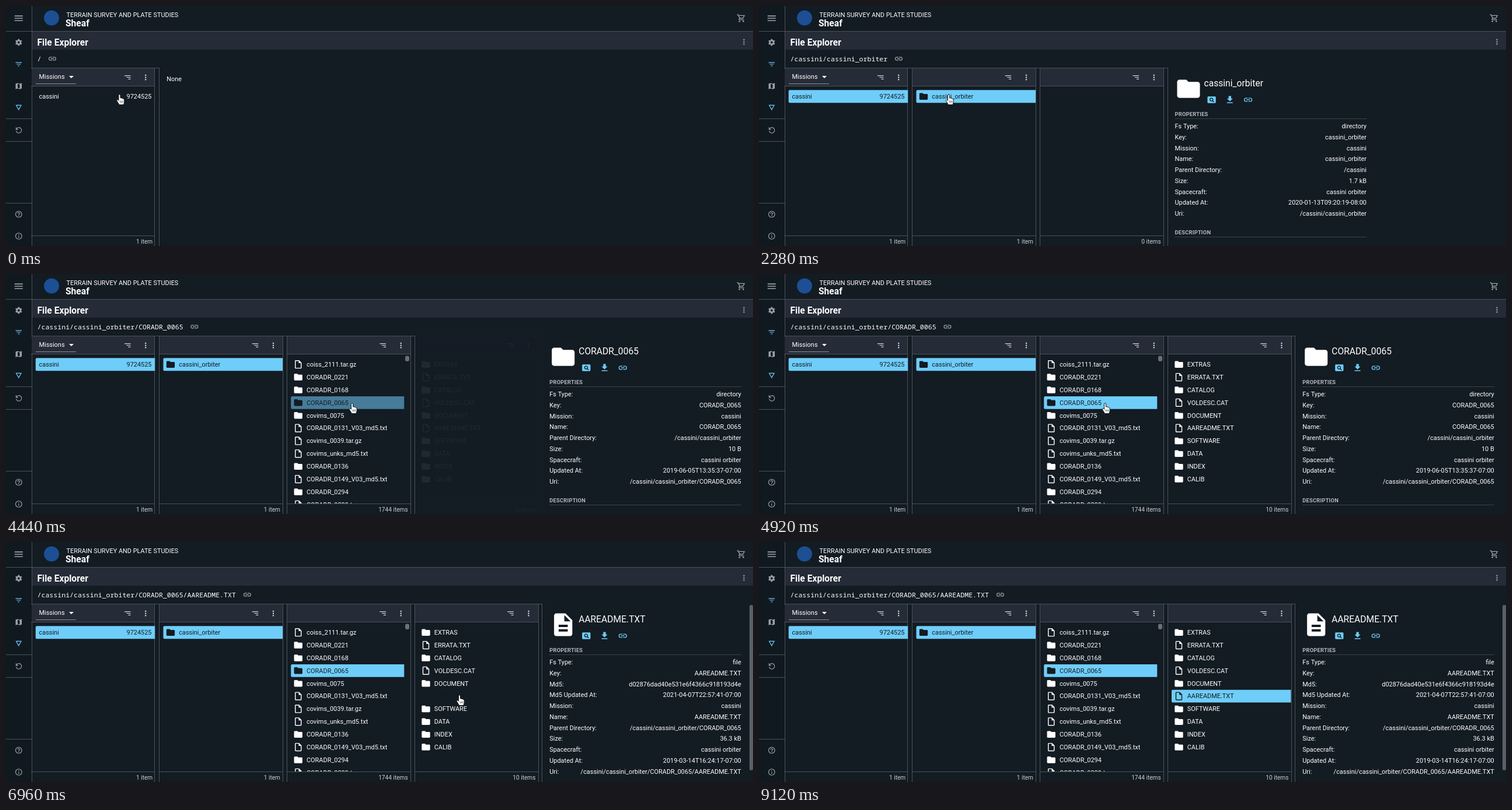
An HTML page with a canvas for the animation above (9.36 s loop, 1280 by 412 pixels).

```html
<!DOCTYPE html>
<html lang="en">
<head>
<meta charset="utf-8">
<title>File Explorer</title>
<style>
html, body { margin: 0; width: 100%; height: 100%; overflow: hidden; background: #131b23; }
canvas { display: block; }
</style>
</head>
<body>
<canvas id="stage" width="1280" height="412"></canvas>
<script>
const ctx = document.getElementById('stage').getContext('2d');
const LOOP = 9360, STEP = 120, U = 0.78125;
const BG = '#131b23', BAR = '#252b37', LINE = '#4b525a', BLUE = '#6fcdf9', GREY = '#9da1a6', WHITE = '#fff';
const SANS = 'Roboto, sans-serif', MONO = '"Noto Sans Mono", monospace';
const COL = 280 * U, ROW = 28 * U, PROP = 24 * U;

const icons = {
  folder: 'M10 4H4c-1.1 0-2 .9-2 2v12c0 1.1.9 2 2 2h16c1.1 0 2-.9 2-2V8c0-1.1-.9-2-2-2h-8z',
  file: 'M14 2H6c-1.1 0-2 .9-2 2v16c0 1.1.9 2 2 2h12c1.1 0 2-.9 2-2V8zM6 20V4h7v5h5v11z',
  doc: 'M14 2H6c-1.1 0-2 .9-2 2v16c0 1.1.9 2 2 2h12c1.1 0 2-.9 2-2V8zM16 18H8v-2h8zM16 14H8v-2h8zM13 9V3.5L18.5 9z',
  menu: 'M3 6h18v2H3zM3 11h18v2H3zM3 16h18v2H3z',
  filter: 'M3 6h18v2H3zM6 11h12v2H6zM10 16h4v2h-4z',
  sort: 'M3 6h18v2H3zM9 11h12v2H9zM14 16h7v2h-7z',
  map: 'M20.5 3L15 5.1 9 3 3.4 4.9 3 5.4v15.1l.5.5L9 18.9l6 2.1 5.6-1.9.4-.5V3.5zM15 19l-6-2.1V5l6 2.1z',
  triangle: 'M3 4l9 16 9-16zM6.4 6h11.2L12 16z',
  link: 'M3.9 12c0-1.7 1.4-3.1 3.1-3.1h4V7H7a5 5 0 0 0 0 10h4v-1.9H7c-1.7 0-3.1-1.4-3.1-3.1zM8 13h8v-2H8zM17 7h-4v1.9h4a3.1 3.1 0 0 1 0 6.2h-4V17h4a5 5 0 0 0 0-10z',
  search: 'M20 4H4c-1.1 0-2 .9-2 2v12c0 1.1.9 2 2 2h16c1.1 0 2-.9 2-2V6c0-1.1-.9-2-2-2zM16.8 18.2l-2.9-2.9a4.5 4.5 0 1 1 1.4-1.4l2.9 2.9zM11.5 9a2.5 2.5 0 1 0 .01 0z',
  download: 'M19 9h-4V3H9v6H5l7 7zM5 18v2h14v-2z',
  help: 'M12 2a10 10 0 1 0 .01 0zM12 4a8 8 0 1 1-.01 0zM11 16h2v2h-2zM12 6c-2.2 0-4 1.8-4 4h2a2 2 0 1 1 4 0c0 2-3 1.8-3 5h2c0-2.3 3-2.5 3-5 0-2.2-1.8-4-4-4z',
  info: 'M12 2a10 10 0 1 0 .01 0zM12 4a8 8 0 1 1-.01 0zM11 7h2v2h-2zM11 11h2v6h-2z',
  cart: 'M15.5 13c.8 0 1.4-.4 1.8-1l3.6-6.5c.4-.7-.1-1.5-.9-1.5H5.2l-.9-2H1v2h2l3.6 7.6-1.4 2.4c-.7 1.4.3 3 1.8 3h12v-2H7l1.1-2zM6.2 6h12.1l-2.8 5h-7zM7 18a2 2 0 1 0 .01 0zM17 18a2 2 0 1 0 .01 0z',
  more: 'M12 4a2 2 0 1 0 .01 0zM12 10a2 2 0 1 0 .01 0zM12 16a2 2 0 1 0 .01 0z'
};
for (const k in icons) icons[k] = new Path2D(icons[k]);
const undo = new Path2D('M4.5 4v6h6M5 9.5A8 8 0 1 1 4.6 14.5');
const hand = new Path2D('M-1.5 1.2Q-1.4-.3 0-.3T1.5 1.2V6Q3.4 5 4.2 6.7 5.8 5.9 6.4 7.4 8.1 7 8.2 9V12.5Q8.1 15 6.8 17.5H-.5Q-2.5 14-4.6 10.8-5.2 9.2-3.8 8.8-2.6 8.8-1.5 10.3Z');

const clicks = [120, 1560, 4440, 6960];
const rowFadeStart = [10, 1450, 4330, 6960];
const itemsLoaded = 2520;

const folderNames = new Set('EXTRAS CATALOG DOCUMENT SOFTWARE DATA INDEX CALIB CORADR_0221 CORADR_0168 CORADR_0065 covims_0075 CORADR_0136 CORADR_0294 cassini_orbiter'.split(' '));
const lists = [
  ['cassini'],
  ['cassini_orbiter'],
  'coiss_2111.tar.gz CORADR_0221 CORADR_0168 CORADR_0065 covims_0075 CORADR_0131_V03_md5.txt covims_0039.tar.gz covims_unks_md5.txt CORADR_0136 CORADR_0149_V03_md5.txt CORADR_0294 CORADR_0289.tar.gz'.split(' '),
  'EXTRAS ERRATA.TXT CATALOG VOLDESC.CAT DOCUMENT AAREADME.TXT SOFTWARE DATA INDEX CALIB'.split(' ')
];
const chosen = [0, 0, 3, 5];
const counts = ['1 item', '1 item', '1744 items', '10 items'];
const paths = ['/', '/', '/cassini/cassini_orbiter', '/cassini/cassini_orbiter/CORADR_0065', '/cassini/cassini_orbiter/CORADR_0065/AAREADME.TXT'];

const entry = (type, name, parent, size, updated, md5 = []) => [
  ['Fs Type:', type], ['Key:', name], ...md5, ['Mission:', 'cassini'], ['Name:', name],
  ['Parent Directory:', parent], ['Size:', size], ['Spacecraft:', 'cassini orbiter'],
  ['Updated At:', updated], ['Uri:', parent + '/' + name]
];
const details = [
  null,
  ['cassini', [['Doc Count:', '9724525'], ['Key:', 'cassini']]],
  ['cassini_orbiter', entry('directory', 'cassini_orbiter', '/cassini', '1.7 kB', '2020-01-13T09:20:19-08:00')],
  ['CORADR_0065', entry('directory', 'CORADR_0065', paths[2], '10 B', '2019-06-05T13:35:37-07:00')],
  ['AAREADME.TXT', entry('file', 'AAREADME.TXT', paths[3], '36.3 kB', '2019-03-14T16:24:17-07:00',
    [['Md5:', 'd02876dad40e531e6f4366c918193d4e'], ['Md5 Updated At:', '2021-04-07T22:57:41-07:00']])]
];

// time, x, y of the fingertip
const route = [
  [0, 194.5, 152], [720, 194.5, 152], [1200, 325, 152], [2520, 325, 152], [3480, 560, 205], [3720, 560, 205],
  [4200, 593, 222], [5160, 593, 222], [5880, 757, 239], [6360, 777, 263], [8400, 777, 263], [8880, 790, 425]
];

const clamp = v => Math.max(0, Math.min(1, v));
const ease = v => v * v * (3 - 2 * v);

function rect(x, y, w, h, color) {
  ctx.fillStyle = color;
  ctx.fillRect(x, y, w, h);
}
const hLine = (x0, x1, y, color = LINE) => rect(x0, y, x1 - x0, 1, color);
const vLine = (x, y0, y1) => rect(x, y0, 1, y1 - y0, LINE);

// y is the middle of the capitals
function text(str, x, y, { size = 14, weight = 400, color = WHITE, align = 'left', font = SANS, spacing = 0 } = {}) {
  ctx.font = `${weight} ${size * U}px ${font}`;
  ctx.letterSpacing = spacing + 'px';
  ctx.textAlign = align;
  ctx.fillStyle = color;
  ctx.fillText(str, x, y + size * U * 0.355);
}

function inBox(x, y, size, draw) {
  ctx.save();
  ctx.translate(x - size / 2, y - size / 2);
  ctx.scale(size / 24, size / 24);
  draw();
  ctx.restore();
}
function icon(name, x, y, size, color = GREY) {
  inBox(x, y, size, () => {
    ctx.fillStyle = color;
    ctx.fill(icons[name], 'evenodd');
  });
}

function gear(x, y) {
  ctx.strokeStyle = GREY;
  ctx.lineWidth = 2.6;
  ctx.beginPath();
  ctx.arc(x, y, 3.2, 0, 7);
  ctx.stroke();
  for (let i = 0; i < 6; i++) {
    const a = i * Math.PI / 3 + Math.PI / 6;
    ctx.beginPath();
    ctx.moveTo(x + 4 * Math.cos(a), y + 4 * Math.sin(a));
    ctx.lineTo(x + 5.8 * Math.cos(a), y + 5.8 * Math.sin(a));
    ctx.stroke();
  }
}

function frameOfApp() {
  rect(0, 0, 1280, 412, BG);
  rect(0, 0, 44, 412, '#111920');
  rect(45, 44, 1235, 31, BAR);
  hLine(0, 1280, 43);
  vLine(44, 0, 412);
  for (const y of [193, 232, 338]) hLine(0, 44, y);

  const x = 21.75, s = 18 * U;
  icon('menu', x, 21, 24 * U);
  gear(x, 62.5);
  icon('filter', x, 100, s, BLUE);
  icon('map', x, 137.5, s);
  icon('triangle', x, 174.5, s, BLUE);
  inBox(x, 213, s, () => {
    ctx.strokeStyle = GREY;
    ctx.lineWidth = 2;
    ctx.stroke(undo);
  });
  icon('help', x, 357.5, s);
  icon('info', x, 395, s);

  ctx.fillStyle = '#1c4f94';
  ctx.beginPath();
  ctx.arc(78, 20.5, 13, 0, 7);
  ctx.fill();
  text('TERRAIN SURVEY AND PLATE STUDIES', 103.5, 15);
  text('Sheaf', 102, 29, { size: 20, weight: 700 });
  icon('cart', 1260, 21, 16);
  text('File Explorer', 53.5, 62.5, { size: 20, weight: 700 });
  icon('more', 1264.5, 61.5, 15);
}

function pathBar(path) {
  text(path, 53.5, 90.5, { size: 11.595 / U, font: MONO });
  icon('link', 72.5 + 6.957 * path.length, 90.5, 20 * U);
}

function column(i, t, depth) {
  const x = 43.75 + COL * i, left = Math.floor(x), right = left + 212;
  ctx.save();
  if (i) ctx.globalAlpha = clamp((t - clicks[i - 1] + 25) / 400);
  const alpha = ctx.globalAlpha;
  rect(left + 1, 107, 211, 30, BAR);
  hLine(left, Math.round(x + COL), 106);
  hLine(left, right, 137);
  hLine(left, right, 394);
  vLine(right - 1 + (i ? 1 : 0), 107, 412);
  vLine(Math.floor(x + COL), 106, 412);
  icon('sort', x + 164.5, 122.5, 18 * U, '#d4d6d9');
  icon('more', x + 195.5, 122.5, 15, '#d4d6d9');
  const loaded = i !== 2 || t >= itemsLoaded;
  text(loaded ? counts[i] : '0 items', x + 207.5, 404, { size: 13, color: '#cdcfd2', align: 'right' });

  if (i === 0) {
    text('Missions', 56.5, 121.5);
    ctx.fillStyle = WHITE;
    ctx.beginPath();
    ctx.moveTo(108, 120);
    ctx.lineTo(116, 120);
    ctx.lineTo(112, 124);
    ctx.fill();
    hLine(51, 120, 133, '#8d9298');
  }

  if (loaded) {
    if (i === 2) {
      ctx.globalAlpha = clamp((t - itemsLoaded + 120) / 360);
      ctx.fillStyle = '#6a7077';
      ctx.beginPath();
      ctx.roundRect(684, 140.5, 7, 9.5, 3);
      ctx.fill();
    }
    ctx.beginPath();
    ctx.rect(left, 138, 213, 256);
    ctx.clip();
    lists[i].forEach((name, r) => listRow(i, r, name, x, depth, t));
  }
  ctx.globalAlpha = alpha;
  ctx.restore();
}

function listRow(i, r, name, x, depth, t) {
  const y = 155.2 + ROW * r, picked = depth > i && r === chosen[i];
  if (picked) {
    ctx.save();
    ctx.globalAlpha *= clamp((t - rowFadeStart[i]) / 200);
    ctx.fillStyle = BLUE;
    ctx.beginPath();
    ctx.roundRect(x + 7, y - ROW / 2, i === 2 ? 194 : 204.5, ROW, [2, 0, 0, 2]);
    ctx.fill();
    ctx.restore();
  }
  const color = picked ? BG : WHITE;
  if (i === 0) {
    text(name, 56.5, y - 0.5, { color });
    text('9724525', 249.5, y - 0.5, { color, align: 'right' });
  } else {
    icon(folderNames.has(name) ? 'folder' : 'file', x + 19.5, y, 22 * U, color);
    text(name, x + 33.75, y, { color });
  }
}

function detailPane(depth) {
  const x = 43.75 + COL * Math.min(depth + 1, 4);
  if (!depth) return text('None', x + 12.8, 125);
  const [name, props] = details[depth];
  const heading = { size: 12, weight: 700, color: '#b4b8bc', spacing: 0.2 };
  const end = x + 341;
  icon(depth === 4 ? 'doc' : 'folder', x + 36, 142, 60 * U, WHITE);
  text(name, x + 62.5, 132, { size: 20 });
  ['search', 'download', 'link'].forEach((k, i) => icon(k, x + 75.6 + 31.25 * i, 161, 22 * U, BLUE));
  text('PROPERTIES', x + 12.5, 185.5, heading);
  hLine(x + 12.5, end, 193, '#3b424a');
  props.forEach(([key, value], i) => {
    const y = 206.2 + PROP * i;
    text(key, x + 12.5, y);
    text(value, end, y, { align: 'right' });
  });
  const y = 206.2 + PROP * (props.length - 1) + 32;
  text('DESCRIPTION', x + 12.5, y, heading);
  hLine(x + 12.5, end, Math.round(y + 7.5), '#3b424a');
  if (depth === 4) {
    ctx.fillStyle = '#5a6067';
    ctx.beginPath();
    ctx.roundRect(1274, 108, 6, 284, 3);
    ctx.fill();
  }
}

function cursor(t) {
  const next = route.findIndex(p => p[0] > t);
  if (next < 0) return;
  const [t0, x0, y0] = route[next - 1], [t1, x1, y1] = route[next];
  const k = ease((t - t0) / (t1 - t0));
  ctx.save();
  ctx.translate(x0 + (x1 - x0) * k, y0 + (y1 - y0) * k);
  ctx.fillStyle = WHITE;
  ctx.strokeStyle = '#10161c';
  ctx.lineWidth = 1;
  ctx.fill(hand);
  ctx.stroke(hand);
  ctx.beginPath();
  for (const x of [1.3, 3.5, 5.7]) {
    ctx.moveTo(x, 10.5);
    ctx.lineTo(x, 14);
  }
  ctx.lineWidth = 0.7;
  ctx.stroke();
  ctx.restore();
}

function draw(now) {
  const t = Math.floor((now % LOOP) / STEP) * STEP;
  const depth = clicks.filter(c => t >= c).length;
  frameOfApp();
  pathBar(paths[depth]);
  for (let i = 0; i <= Math.min(depth, 3); i++) column(i, t, depth);
  detailPane(depth);
  cursor(t);
}

let start;
function tick(now) {
  start ??= now;
  draw(now - start);
  requestAnimationFrame(tick);
}
requestAnimationFrame(tick);
</script>
</body>
</html>
```
